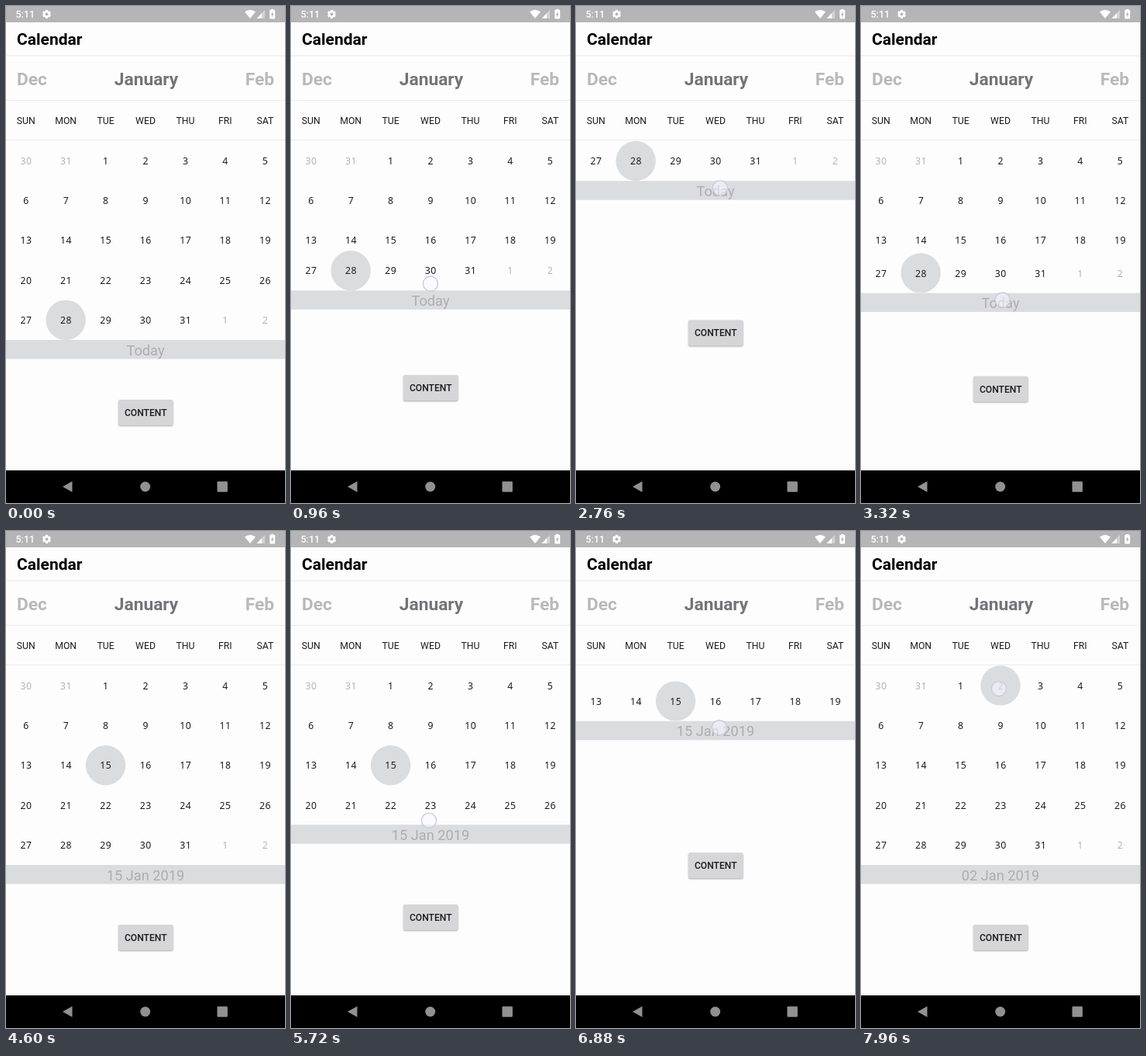
An HTML page with a canvas that plays this animation: 360 by 640 pixels, repeating every 8000 ms.

```html
<!DOCTYPE html>
<html lang="en">
<head>
<meta charset="utf-8">
<title>Calendar</title>
<style>
html, body { margin: 0; width: 100%; height: 100%; overflow: hidden; background: #fefdfe; }
canvas { display: block; width: 360px; height: 640px; }
</style>
</head>
<body>
<canvas id="stage"></canvas>
<script>
const W = 360, H = 640, LOOP = 8000;
const COL = W / 7, ROW = 51.35, TOP = 173.3;
const OPEN = TOP + ROW * 5, CLOSED = 225, BAR_H = 24.5;
const PAPER = '#fefdfe', GREY = '#dadde0', INK = '#1c1b1d', PALE = '#b2b1b3';
const ROBOTO = 'Roboto, sans-serif', NOTO = '"Noto Sans", sans-serif';
const DAYS = ['SUN', 'MON', 'TUE', 'WED', 'THU', 'FRI', 'SAT'];

const canvas = document.getElementById('stage');
const ctx = canvas.getContext('2d');
const dpr = window.devicePixelRatio || 1;
canvas.width = W * dpr;
canvas.height = H * dpr;

// top edge of the date bar: [time, y]
const barKeys = [
  [0, OPEN], [460, OPEN], [1200, 336], [1560, 284.5], [2000, 228], [2080, CLOSED],
  [2760, CLOSED], [2800, 234], [3160, 328], [3520, 421], [3640, OPEN],
  [5420, OPEN], [5720, 378.5], [5960, 314], [6200, 238], [6320, CLOSED],
  [6879, CLOSED], [6880, 244.5], [7240, 345], [7520, 424], [7600, OPEN]
];

// finger contacts: lifetime and path of [time, x, y]
const touches = [
  { end: 2240, path: [[400, 180, 441], [520, 180, 416], [1200, 180, 326], [1560, 181, 275], [2040, 183, 214], [2240, 184, 206]] },
  { end: 3640, path: [[2760, 186, 234], [3160, 184, 337], [3520, 181, 430], [3640, 180, 440]] },
  { end: 4520, path: [[4400, 128, 303]] },
  { end: 6400, path: [[5400, 176, 438], [5720, 178, 373], [6200, 182, 231], [6400, 184, 212]] },
  { end: 7600, path: [[6880, 185, 253], [7240, 183, 354], [7600, 180, 440]] },
  { end: 8000, path: [[7960, 178, 203]] }
];

// chosen cell, counted from 30 December
const picks = [
  { at: 0, cell: 29, label: 'Today' },
  { at: 4400, cell: 16, label: '15 Jan 2019' },
  { at: 7960, cell: 3, label: '02 Jan 2019' }
];

function track(keys, t, k = 1) {
  if (t <= keys[0][0]) return keys[0][k];
  for (let i = 1; i < keys.length; i++) {
    const a = keys[i - 1], b = keys[i];
    if (t <= b[0]) return a[k] + (b[k] - a[k]) * (t - a[0]) / (b[0] - a[0]);
  }
  return keys[keys.length - 1][k];
}

function text(str, x, y, font, color, align = 'center', spacing = 0) {
  ctx.font = font;
  ctx.fillStyle = color;
  ctx.textAlign = align;
  ctx.letterSpacing = spacing + 'px';
  ctx.fillText(str, x + spacing / 2, y);
}

function rect(x, y, w, h, color) {
  ctx.fillStyle = color;
  ctx.fillRect(x, y, w, h);
}

function disc(x, y, r, color) {
  ctx.fillStyle = color;
  ctx.beginPath();
  ctx.arc(x, y, r, 0, Math.PI * 2);
  ctx.fill();
}

function poly(points, color) {
  ctx.fillStyle = color;
  ctx.beginPath();
  points.forEach(([x, y]) => ctx.lineTo(x, y));
  ctx.closePath();
  ctx.fill();
}

function statusBar() {
  const bg = '#b5b4b6';
  rect(0, 0, W, 21, bg);
  text('5:11', 12.5, 15, '500 12.5px ' + ROBOTO, '#fff', 'left');

  // gear
  ctx.save();
  ctx.translate(52.5, 10.5);
  for (let i = 0; i < 6; i++) {
    rect(-1.6, -5.5, 3.2, 3, '#fff');
    ctx.rotate(Math.PI / 3);
  }
  ctx.restore();
  disc(52.5, 10.5, 4.2, '#fff');
  disc(52.5, 10.5, 1.9, bg);

  // wifi fan
  ctx.fillStyle = '#fff';
  ctx.beginPath();
  ctx.moveTo(315, 16);
  ctx.lineTo(308, 7.5);
  ctx.quadraticCurveTo(315, 2.5, 322, 7.5);
  ctx.closePath();
  ctx.fill();

  // signal
  poly([[323.5, 16], [334, 16], [334, 5]], '#d3d2d4');
  poly([[323.5, 16], [330, 16], [330, 9.2]], '#fff');

  // battery
  rect(342, 4, 3.4, 2, '#fff');
  ctx.beginPath();
  ctx.roundRect(340.2, 5, 7, 11.4, 1);
  ctx.fill();
  poly([[344.3, 7], [341.8, 11.4], [343.3, 11.4], [343.1, 14.4], [345.6, 10], [344.2, 10]], bg);
}

function header() {
  text('Calendar', 14, 50.4, 'bold 21px ' + ROBOTO, '#000', 'left');
  const big = 'bold 22.75px ' + ROBOTO;
  text('Dec', 14, 102, big, '#b9b8bb', 'left');
  text('January', 181, 102, big, '#757378');
  text('Feb', 346, 102, big, '#b9b8bb', 'right');
  DAYS.forEach((d, i) => text(d, COL * (i + 0.5), 152.4, '12.25px ' + ROBOTO, INK));
  [63.5, 121, 172].forEach(y => rect(0, y, W, 1, '#ebeaec'));
}

function week(r, y, pick, dim) {
  for (let c = 0; c < 7; c++) {
    const cell = r * 7 + c, x = COL * (c + 0.5);
    const day = (cell + 29) % 31 + 1;
    const chosen = cell === pick.cell;
    if (chosen) disc(x, y + ROW / 2, COL / 2, GREY);
    const outside = cell < 2 || cell > 32;
    ctx.globalAlpha = chosen ? dim : 1;
    text(day, x, y + 30.4, '12.25px ' + NOTO, outside ? PALE : INK, 'center', 0.5);
    ctx.globalAlpha = 1;
  }
}

function button(y) {
  ctx.save();
  ctx.shadowColor = 'rgba(0,0,0,.32)';
  ctx.shadowBlur = 2 * dpr;
  ctx.shadowOffsetY = dpr;
  ctx.fillStyle = '#d6d5d7';
  ctx.beginPath();
  ctx.roundRect(145, y - 16.5, 70.5, 33, 2);
  ctx.fill();
  ctx.restore();
  text('CONTENT', 180.2, y + 4.4, '500 12.1px ' + ROBOTO, INK);
}

function navBar() {
  rect(0, 598, W, 42, '#000');
  const c = '#919092';
  poly([[73, 619], [85.5, 612], [85.5, 626]], c);
  disc(179.7, 619, 6.5, c);
  ctx.fillStyle = c;
  ctx.beginPath();
  ctx.roundRect(272.5, 612.3, 13.4, 13.4, 1);
  ctx.fill();
}

function ring(t) {
  const touch = touches.find(f => t >= f.path[0][0] && t < f.end);
  if (!touch) return;
  disc(track(touch.path, t, 1), track(touch.path, t, 2), 9.6, 'rgba(248,248,255,.55)');
  ctx.strokeStyle = '#cbcae3';
  ctx.lineWidth = 1.4;
  ctx.stroke();
}

function draw(t) {
  const bar = track(barKeys, t);
  const pick = picks.filter(p => t >= p.at).pop();
  const dim = pick.at === 0 ? 1 : track([[0, 0.35], [120, 0.35], [200, 1]], t - pick.at);

  ctx.setTransform(dpr, 0, 0, dpr, 0, 0);
  rect(0, 0, W, H, PAPER);
  statusBar();
  header();

  const active = Math.floor(pick.cell / 7);
  for (let r = 0; r < 5; r++) {
    if (r !== active) week(r, TOP + r * ROW, pick, dim);
  }
  // the chosen week rides on the bar and covers the others
  const y = Math.min(TOP + active * ROW, bar - ROW);
  rect(0, y, W, ROW, PAPER);
  week(active, y, pick, dim);

  rect(0, bar, W, 598 - bar, PAPER);
  rect(0, bar, W, BAR_H, GREY);
  text(pick.label, 180, bar + 19.7, '18.2px ' + ROBOTO, '#adacaf');
  button(523.5 - (OPEN - bar) / 2);
  navBar();
  ring(t);
}

const start = performance.now();
function frame() {
  draw((performance.now() - start) % LOOP);
  requestAnimationFrame(frame);
}
frame();
</script>
</body>
</html>
```
